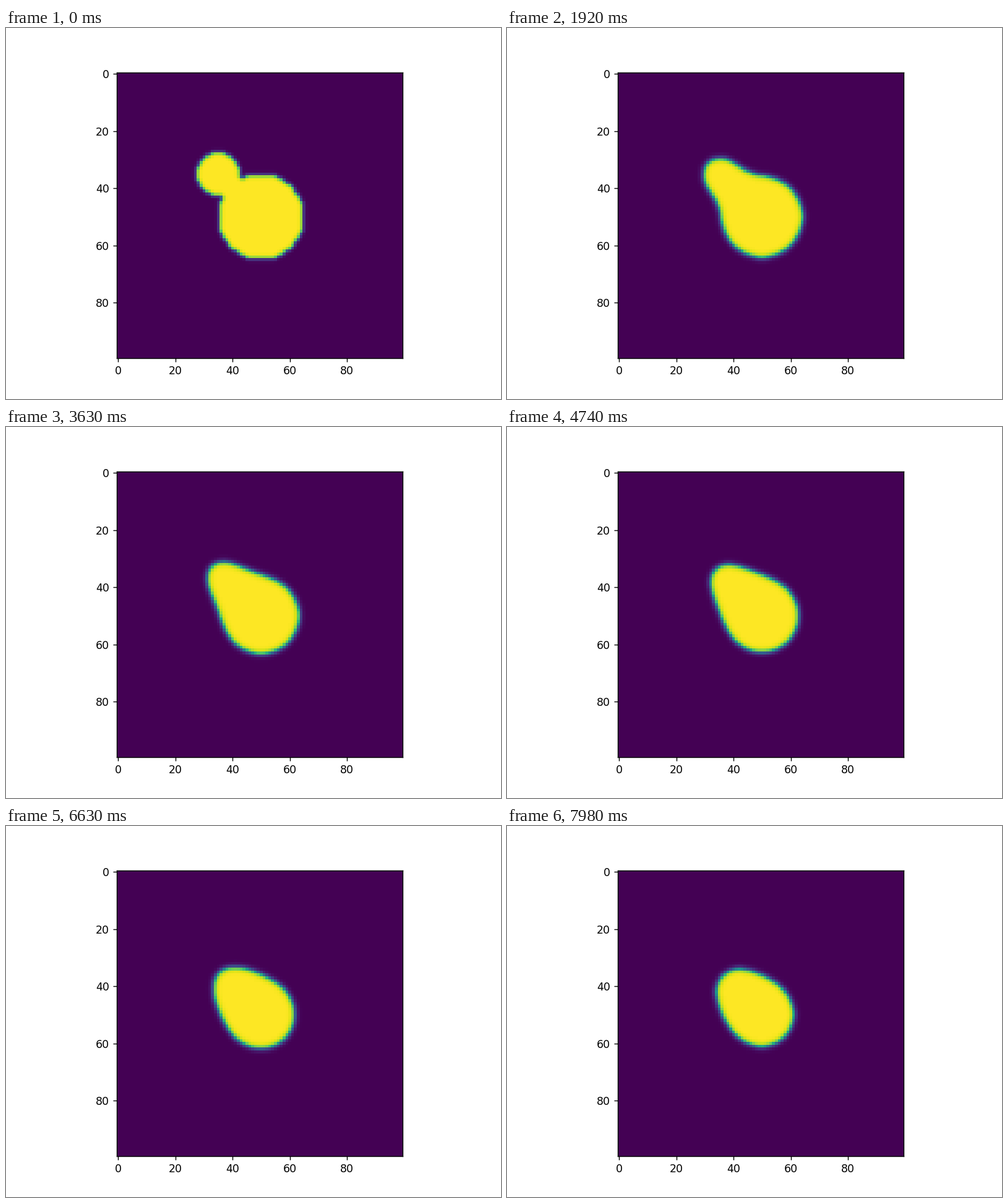
Recreate the animation shown at these times as a matplotlib script. Size 800 px wide and 600 px high, loop 8000 ms.

```python
import matplotlib.pyplot as plt
import numpy as np
from matplotlib.animation import FuncAnimation

SIZE = 100            # grid cells per side
LOOP_MS = 8000
INTERVAL = 32
STEP_MS = 30          # model time between stored states
SUBSTEPS = 5
DIFFUSION = 0.25      # per stored state
REACTION = 1.0


def disc(cx, cy, radius):
    y, x = np.mgrid[:SIZE, :SIZE]
    return (x - cx) ** 2 + (y - cy) ** 2 < radius ** 2


def laplacian(u):
    return (np.roll(u, 1, 0) + np.roll(u, -1, 0)
            + np.roll(u, 1, 1) + np.roll(u, -1, 1) - 4 * u)


def advance(u):
    """Allen-Cahn flow: diffusion balanced by a double-well reaction."""
    dt = 1 / SUBSTEPS
    for _ in range(SUBSTEPS):
        well = u * (1 - u) * (1 - 2 * u)
        u = u + dt * (DIFFUSION * laplacian(u) - REACTION * well)
    return u


def evolve(count):
    phase = (disc(50, 50, 15) | disc(35, 35, 7.5)).astype(float)
    states = []
    for _ in range(count):
        phase = advance(phase)
        states.append(phase)
    return states


states = evolve(LOOP_MS // STEP_MS + 1)

fig, ax = plt.subplots(figsize=(6.4, 4.8), dpi=125)
image = ax.imshow(states[0], cmap="viridis", vmin=0, vmax=1)


def draw(frame):
    index = -(-frame * INTERVAL // STEP_MS)
    image.set_data(states[min(index, len(states) - 1)])
    return (image,)


anim = FuncAnimation(fig, draw, frames=LOOP_MS // INTERVAL, interval=INTERVAL,
                     init_func=lambda: draw(0), repeat=True, repeat_delay=0)

plt.show()
```
